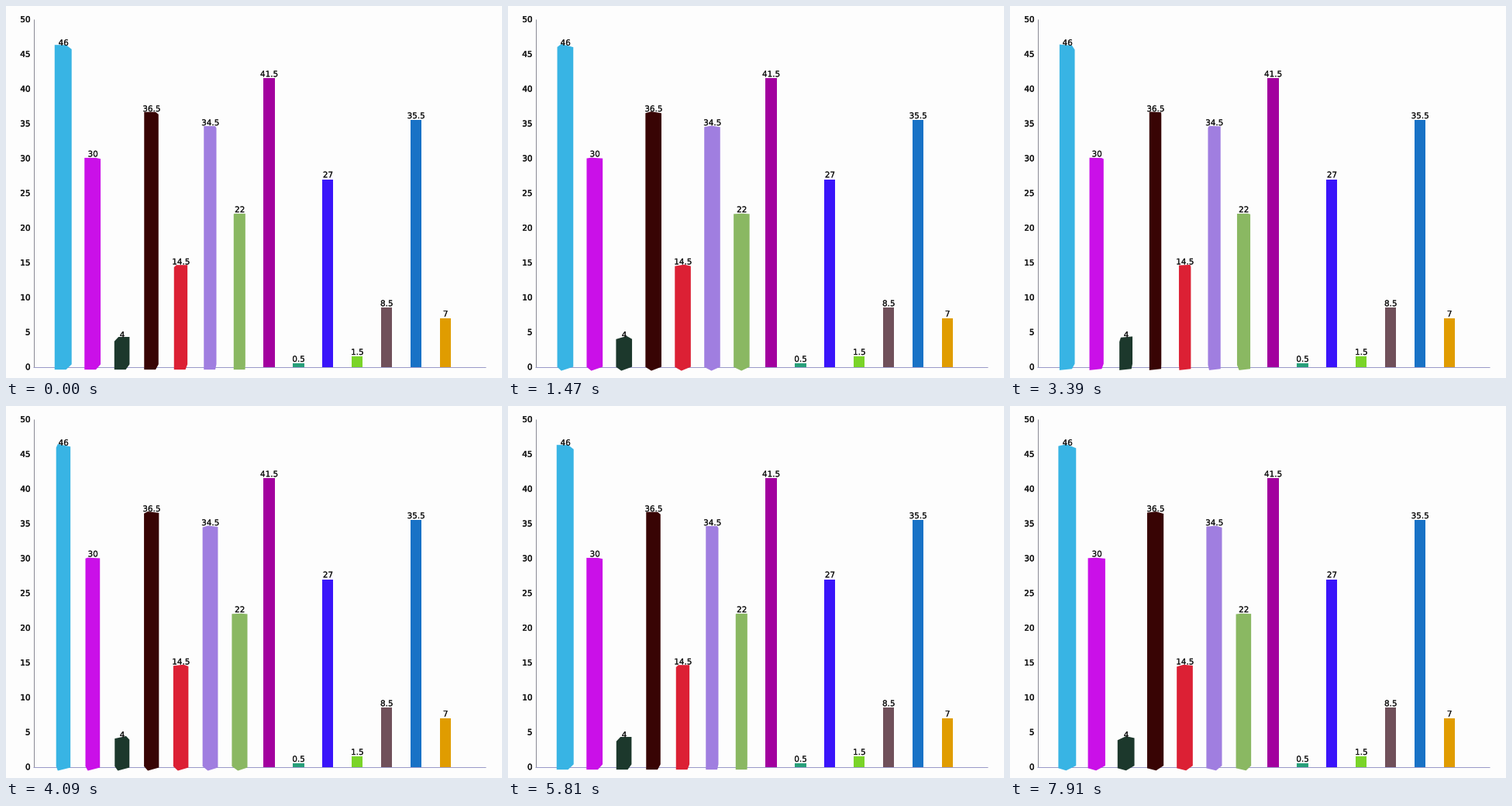
These frames come from a looping animation (640 px wide and 480 px high, 8000 ms). A matplotlib script:

```python
import math

import matplotlib.pyplot as plt
from matplotlib import patheffects
from matplotlib.animation import FuncAnimation
from matplotlib.patches import Polygon, Rectangle

W, H, DPI = 640, 480, 100
PX = 72 / DPI
INTERVAL, LOOP = 20, 8000

BASE, UNIT = 465.7, 8.97      # zero line and pixels per unit
FIRST_X, PITCH, HALF = 73.9, 37.92, 7.25
DEPTH = 480                   # viewing distance
TURN = 1.44                   # degrees per step
SPINNING = 7
INK = "#161616"

BARS = [
    (46, "#38b4e4"), (30, "#ca10e8"), (4, "#1c382c"), (36.5, "#380404"),
    (14.5, "#dc2034"), (34.5, "#a07ee0"), (22, "#8ab862"), (41.5, "#a2009e"),
    (0.5, "#28a07a"), (27, "#3a14fa"), (1.5, "#7ad428"), (8.5, "#70505a"),
    (35.5, "#1872c6"), (7, "#e09c00"),
]

fig = plt.figure(figsize=(W / DPI, H / DPI), dpi=DPI, facecolor="#fdfdfd")
ax = fig.add_axes([0, 0, 1, 1])
ax.set_xlim(0, W)
ax.set_ylim(H, 0)
ax.axis("off")


def label(x, y, text, align, weight):
    """Digits whose middle sits at height y."""
    ax.text(x, y + 3.8, text, ha=align, va="baseline", color=INK,
            family="DejaVu Sans", fontsize=10.4 * PX, zorder=5,
            path_effects=[patheffects.withStroke(linewidth=weight * PX,
                                                 foreground=INK)])


def line(xs, ys, color):
    ax.plot(xs, ys, color=color, lw=PX, zorder=1, solid_capstyle="butt")


def step_at(t):
    """Steps come in threes, held for 100, 20 and 20 ms."""
    if t < 70:
        return 0 if t < 20 else 1
    group, rest = divmod(t - 70, 140)
    return 2 + 3 * group + (rest >= 100) + (rest >= 120)


def project(x, y, z):
    s = DEPTH / (DEPTH - z)
    return W / 2 + (x - W / 2) * s, H / 2 + (y - H / 2) * s


def half_hull(points):
    out = []
    for x, y in points:
        while len(out) > 1:
            (x0, y0), (x1, y1) = out[-2:]
            if (x1 - x0) * (y - y0) - (y1 - y0) * (x - x0) > 0:
                break
            out.pop()
        out.append((x, y))
    return out[:-1]


def outline(cx, top, angle):
    """Silhouette of a square column turned about its own axis."""
    c, s = math.cos(angle), math.sin(angle)
    points = []
    for x in (-HALF, HALF):
        for z in (-HALF, HALF):
            for y in (top, BASE):
                points.append(project(cx + x * c - z * s, y, x * s + z * c))
    points.sort()
    return half_hull(points) + half_hull(points[::-1])


line([35.5, 35.5], [17, 466], "#8a8a96")
line([35, 619], [465.5, 465.5], "#9a9ac8")
line([0, W], [479.5, 479.5], "#d0d0d0")
for tick in range(0, 51, 5):
    label(31.5, BASE - tick * UNIT - 0.2, str(tick), "right", 0.4)

columns = []
for i, (value, color) in enumerate(BARS):
    cx, top = FIRST_X + i * PITCH, BASE - value * UNIT
    if i < SPINNING:
        patch = Polygon(outline(cx, top, 0), fc=color, lw=0, zorder=2)
        columns.append((patch, cx, top))
    else:
        patch = Rectangle((cx - HALF, top), 2 * HALF, BASE - top,
                          fc=color, lw=0, zorder=2)
    ax.add_patch(patch)
    label(cx + 0.3, top - 6, f"{value:g}", "center", 0.15)


def draw(frame):
    step = step_at(frame * INTERVAL + INTERVAL // 2)
    angle = -math.radians(TURN * step)
    for patch, cx, top in columns:
        patch.set_xy(outline(cx, top, angle))
    return [patch for patch, _, _ in columns]


anim = FuncAnimation(fig, draw, frames=LOOP // INTERVAL, interval=INTERVAL,
                     repeat=True, repeat_delay=0, blit=False)
plt.show()
```
